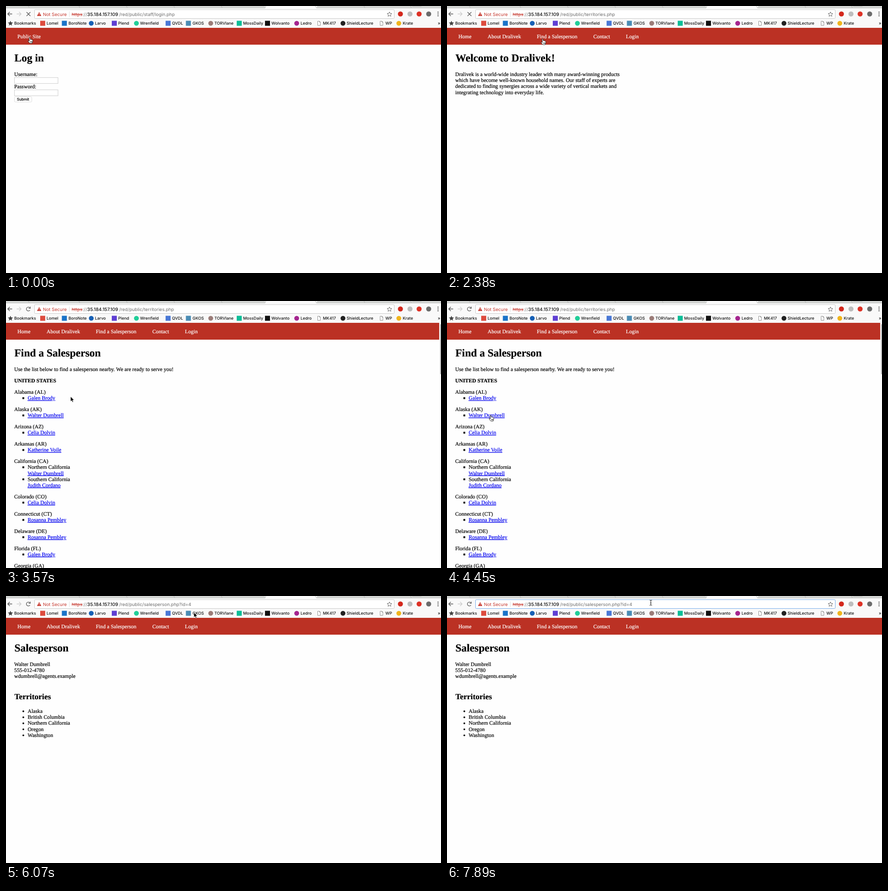
These frames come from a looping animation (954 px wide and 587 px high, 8000 ms). An HTML page:

```html
<!DOCTYPE html>
<html lang="en">
<head>
<meta charset="utf-8">
<title>Browser session</title>
<style>
  html, body { margin: 0; width: 100%; height: 100%; overflow: hidden; background: #fefefe; }
  svg { display: block; width: 954px; height: 587px; }
  text { white-space: pre; text-rendering: geometricPrecision; }
  .ui { font: 500 8.9px Inter, Roboto, sans-serif; fill: #111; }
  .url { font: 9.9px Inter, Roboto, sans-serif; fill: #6c6c6c; }
  .url .alert { fill: #c5352b; }
  .url .struck { text-decoration: line-through; }
  .url .host { font-size: 10.2px; font-weight: 500; fill: #111; }
  .page { font: 11.75px "Liberation Serif", "Times New Roman", serif; }
  .page text { fill: #000; stroke: #000; stroke-width: .22px; }
  .page .h1 { font-size: 23.5px; font-weight: bold; }
  .page .h2 { font-size: 17.5px; font-weight: bold; }
  .page .b { font-weight: bold; }
  .page .link { fill: #0000ee; stroke: #0000ee; text-decoration: underline; }
  .page .nav { fill: #fff; stroke: #fff; }
  .page .btn { font: 8.1px Inter, Roboto, sans-serif; }
</style>
</head>
<body>
<svg viewBox="0 0 954 587">
  <rect width="954" height="587" fill="#fefefe"/>

  <g id="pages" class="page">
    <rect y="48" width="954" height="37" fill="#bb3124"/>
    <g id="menu"></g>
    <g id="login"></g>
    <g id="welcome"></g>
    <g id="finder"></g>
    <g id="person"></g>
  </g>

  <g id="chrome">
    <rect width="954" height="48" fill="#f9f9f9"/>
    <rect width="954" height="4" fill="#d3d5d3"/>
    <path d="M567 0H683L680 4.5H570Z" fill="#f9f9f9"/>
    <path d="M0 4.5H568L570 0M678 0L681 4.5H954" fill="none" stroke="#b4b6b4" stroke-width=".8"/>
    <path d="M49 0l2 4M160 0l2 4M264 0l2 4M368 0l2 4M472 0l2 4M785 0l2 4M887 0l2 4" stroke="#aaa" stroke-width=".8"/>
    <path d="M890 0h20l2 2h-20z" fill="#c2c4c2"/>

    <g fill="none" stroke="#555" stroke-width="1.3">
      <path d="M13.5 17.5H4M8.3 13L3.8 17.5L8.3 22"/>
      <path d="M23.5 17.5H33M28.7 13L33.2 17.5L28.7 22" stroke="#ccc"/>
      <path id="stop" d="M45 13.5l8.5 8.5M53.5 13.5l-8.5 8.5"/>
      <path id="reload" d="M52.6 20A4.3 4.3 0 1 1 52.2 14.7M53.3 12.5V16.2H49.5"/>
    </g>
    <rect id="field" x="62.5" y="8" width="789" height="19.5" rx="2" fill="#fff" stroke="#c9c9c9"/>
    <rect id="selection" x="144" y="12" width="263.5" height="12" fill="#add2fb"/>
    <path d="M72.7 13.3L77.4 22H68Z" fill="#c5352b"/>
    <path d="M72.7 16v3M72.7 20v1" stroke="#fff"/>
    <path d="M139 12v12" stroke="#d5d5d5" stroke-width=".8"/>
    <path d="M841 13l1.5 3.3 3.6.4-2.7 2.4.8 3.6-3.2-1.9-3.2 1.9.8-3.6-2.7-2.4 3.6-.4z" fill="none" stroke="#555" stroke-width=".9"/>
    <g class="url">
      <text x="81" y="21.5" class="alert">Not Secure</text>
      <text x="144" y="21.5" class="alert struck">https</text>
      <text x="168" y="21.5">://</text>
      <text x="178" y="21.5" class="host">35.184.157.109</text>
      <text id="path" x="248" y="21.5"></text>
    </g>
    <path id="caret" d="M407.5 12v12" stroke="#000"/>
    <path d="M9.7 32.5l1.7 3.6 4 .4-3 2.7.9 3.9-3.6-2-3.5 2 .9-3.9-3-2.7 4-.4z" fill="#444"/>
    <g id="marks" class="ui"></g>
  </g>

  <g id="cursor">
    <path id="arrow" d="M0 0V11L2.6 8.7L4.3 12.6L6.2 11.8L4.5 8H8Z" fill="#000" stroke="#fff" stroke-width=".8"/>
    <path id="hand" d="M2.6 1.2C2.6-.2 4.6-.2 4.7 1.2L5.1 4.4C6 3.7 7 4 7.2 4.8C8 4.3 8.9 4.6 9 5.4C9.9 5 10.8 5.5 10.7 6.5L10.3 9.5L9.3 13H4.2L.7 8.9C-.2 7.8 1 6.7 2 7.4L3.2 8.3ZM5.7 8.5v2.5M7.3 8.5v2.5M8.8 8.5v2.5" fill="#fff" stroke="#111" stroke-width=".9"/>
    <g id="beam">
      <path d="M-2.5-5.5Q0-5.5 0-4Q0-5.5 2.5-5.5M0-4V4.5M-2.5 6Q0 6 0 4.5Q0 6 2.5 6M-1.2.8H1.2" fill="none" stroke="#111"/>
      <circle id="ring" cy="-.7" r="7.3" fill="none" stroke="#222" stroke-width="1.1"/>
    </g>
  </g>
</svg>

<script>
const LOOP = 8000;
const el = id => document.getElementById(id);
const show = (id, on) => { el(id).style.display = on ? "" : "none"; };

function add(parent, tag, attrs, content) {
  const node = document.createElementNS("http://www.w3.org/2000/svg", tag);
  for (const key in attrs) node.setAttribute(key, attrs[key]);
  if (content) node.textContent = content;
  el(parent).appendChild(node);
}
const text = (parent, x, y, str, cls = "") => add(parent, "text", { x, y, class: cls }, str);
const box = (parent, x, y, width, height, fill, more) =>
  add(parent, "rect", { x, y, width, height, fill, ...more });
const dot = (parent, cx, cy, r, fill) => add(parent, "circle", { cx, cy, r, fill });

// Bookmarks: label, label x, icon shape, icon centre, icon colour
text("marks", 18, 41, "Bookmarks");
[
  ["Lomel", 89, "square", 80.5, "#dd4b3e"],
  ["BoroNote", 137, "square", 128, "#1a73c8"],
  ["Larvo", 195, "circle", 187, "#1660b5"],
  ["Plend", 246, "square", 237.5, "#5f3fd3"],
  ["Wrenfield", 294, "circle", 286, "#21ce99"],
  ["QVDL", 364, "square", 355.5, "#4a78d6"],
  ["GKOS", 409, "square", 400, "#4b8db5"],
  ["TORVlane", 457, "circle", 449, "#9b7c78"],
  ["MossDaily", 520, "square", 511.5, "#0dbe98"],
  ["Wolvanto", 582, "square", 573.5, "#111"],
  ["Ledro", 646, "circle", 637.5, "#a5258f"],
  ["MK417", 695, "sheet", 686.5],
  ["ShieldLecture", 747, "circle", 739, "#222"],
  ["WP", 832, "sheet", 823.5],
  ["Krate", 870, "circle", 861.5, "#f0b51d"],
].forEach(([label, x, shape, cx, fill]) => {
  text("marks", x, 41, label);
  if (shape === "square") box("marks", cx - 5.5, 32.5, 11, 11, fill);
  else if (shape === "circle") dot("marks", cx, 38, 5.3, fill);
  else add("marks", "path", { d: `M${cx - 3} 33.5h4l2 2v7h-6zM${cx + 1} 33.5v2h2`, fill: "#fff", stroke: "#777", "stroke-width": .8 });
});
text("marks", 947, 41, "»");

// Toolbar buttons
[[865, "#d3271c"], [886, "#bdbdbd"], [906, "#dd3125"], [927, "#6b6b6b"]]
  .forEach(([x, fill]) => dot("marks", x, 17.5, 5.5, fill));
[13.5, 17.5, 21.5].forEach(y => dot("marks", 947.5, y, 1.2, "#555"));

// Site navigation
[["Home", 25], ["About Dralivek", 89], ["Find a Salesperson", 197], ["Contact", 321], ["Login", 392.5]]
  .forEach(([label, x]) => text("menu", x, 71, label, "nav"));

// Log in
text("login", 25, 71, "Public Site", "nav");
text("login", 18.5, 122, "Log in", "h1");
[["Username:", 154], ["Password:", 181]].forEach(([label, y]) => {
  text("login", 18, y, label);
  box("login", 18.5, y + 3.3, 95.5, 13, "#fff", { stroke: "#ccc" });
});
box("login", 18.5, 199.5, 38, 11.5, "#fff", { rx: 2, stroke: "#d4d4d4", "stroke-width": .8 });
text("login", 24, 208, "Submit", "btn");

// Welcome
text("welcome", 18.5, 122, "Welcome to Dralivek!", "h1");
[
  "Dralivek is a world-wide industry leader with many award-winning products",
  "which have become well-known household names. Our staff of experts are",
  "dedicated to finding synergies across a wide variety of vertical markets and",
  "integrating technology into everyday life.",
].forEach((line, i) => text("welcome", 18, 154 + i * 13.2, line));

// Find a salesperson
const GALEN = "Galen Brody", WALTER = "Walter Dumbrell", CELIA = "Celia Dolvin",
  ROSANNA = "Rosanna Pembley";
text("finder", 18.5, 122, "Find a Salesperson", "h1");
text("finder", 18, 154, "Use the list below to find a salesperson nearby. We are ready to serve you!");
text("finder", 18, 179, "UNITED STATES", "b");
let row = 204;
[
  ["Alabama (AL)", GALEN],
  ["Alaska (AK)", WALTER],
  ["Arizona (AZ)", CELIA],
  ["Arkansas (AR)", "Katherine Voile"],
  ["California (CA)", WALTER, "Northern California", "Judith Cordano", "Southern California"],
  ["Colorado (CO)", CELIA],
  ["Connecticut (CT)", ROSANNA],
  ["Delaware (DE)", ROSANNA],
  ["Florida (FL)", GALEN],
  ["Georgia (GA)"],
].forEach(([state, ...people]) => {
  text("finder", 18, row, state);
  for (let i = 0; i < people.length; i += 2) {
    row += 13.25;
    box("finder", 36, row - 5.7, 4, 4, "#000");
    if (people[i + 1]) {
      text("finder", 47.5, row, people[i + 1]);
      row += 13.25;
    }
    text("finder", 47.5, row, people[i], "link");
  }
  row += 24.75;
});
box("finder", 950, 48, 4, 539, "#fafafa");
box("finder", 952, 51, 3, 110, "#b8b8b8", { rx: 1 });

// Salesperson
text("person", 18.5, 122, "Salesperson", "h1");
[WALTER, "555-012-4780", "wdumbrell@agents.example"]
  .forEach((line, i) => text("person", 18, 154 + i * 13.2, line));
text("person", 18.5, 227, "Territories", "h2");
["Alaska", "British Columbia", "Northern California", "Oregon", "Washington"].forEach((place, i) => {
  const y = 257 + i * 13.2;
  dot("person", 38, y - 3.5, 1.9, "#000");
  text("person", 47.5, y, place);
});

// Step tables: each row starts at its time and holds until the next
const pageSteps = [[0, "login"], [450, "welcome"], [2530, "finder"], [5050, "person"]];
const urlSteps = [[0, "staff/login.php"], [150, "index.php"], [2380, "territories.php"], [4900, "salesperson.php?id=4"]];
const loadSteps = [[0, true], [450, false], [2230, true], [2680, false], [4900, true], [5050, false]];
const fieldSteps = [[0, ""], [6690, "selected"], [7290, "focus"], [7440, "caret"], [7890, "focus"]];
const ringSteps = [[0, false], [6690, true], [6840, false], [7290, true], [7440, false]];
const cursorSteps = [
  [0, "hand", 48, 69], [450, "hand", 49, 69], [600, "arrow", 74, 76], [750, "arrow", 180, 83],
  [900, "arrow", 330, 84], [1050, "arrow", 436, 80], [1200, "arrow", 381, 75],
  [1350, "arrow", 341, 78], [1500, "arrow", 288, 79], [1650, "hand", 222, 74], [1790, "hand", 206, 72],
  [2830, "arrow", 209, 73], [2980, "arrow", 212, 80], [3120, "arrow", 213, 92], [3270, "arrow", 212, 106],
  [3420, "arrow", 178, 164], [3570, "arrow", 141.5, 210], [3710, "arrow", 130, 226],
  [3860, "arrow", 118, 236], [4010, "hand", 107, 245], [4160, "hand", 99, 248],
  [4300, "hand", 94, 250], [4450, "hand", 92, 251],
  [5680, "arrow", 132, 216], [5830, "arrow", 286, 104], [5980, "arrow", 412, 36], [6220, "beam", 447, 14.5],
];
const at = (steps, t) => steps.reduce((held, step) => step[0] <= t ? step : held);

function draw(t) {
  const page = at(pageSteps, t)[1];
  for (const id of ["login", "welcome", "finder", "person"]) show(id, id === page);
  show("menu", page !== "login");

  const loading = at(loadSteps, t)[1];
  show("stop", loading);
  show("reload", !loading);
  el("path").textContent = "/red/public/" + at(urlSteps, t)[1];

  const field = at(fieldSteps, t)[1];
  el("field").setAttribute("stroke", field ? "#75aaea" : "#c9c9c9");
  show("selection", field === "selected");
  show("caret", field === "caret");

  const [, shape, x, y] = at(cursorSteps, t);
  for (const id of ["arrow", "hand", "beam"]) show(id, id === shape);
  show("ring", at(ringSteps, t)[1]);
  el("cursor").setAttribute("transform", `translate(${x} ${y})`);
}

const start = performance.now();
function tick() {
  draw((performance.now() - start) % LOOP);
  requestAnimationFrame(tick);
}
tick();
</script>
</body>
</html>
```
